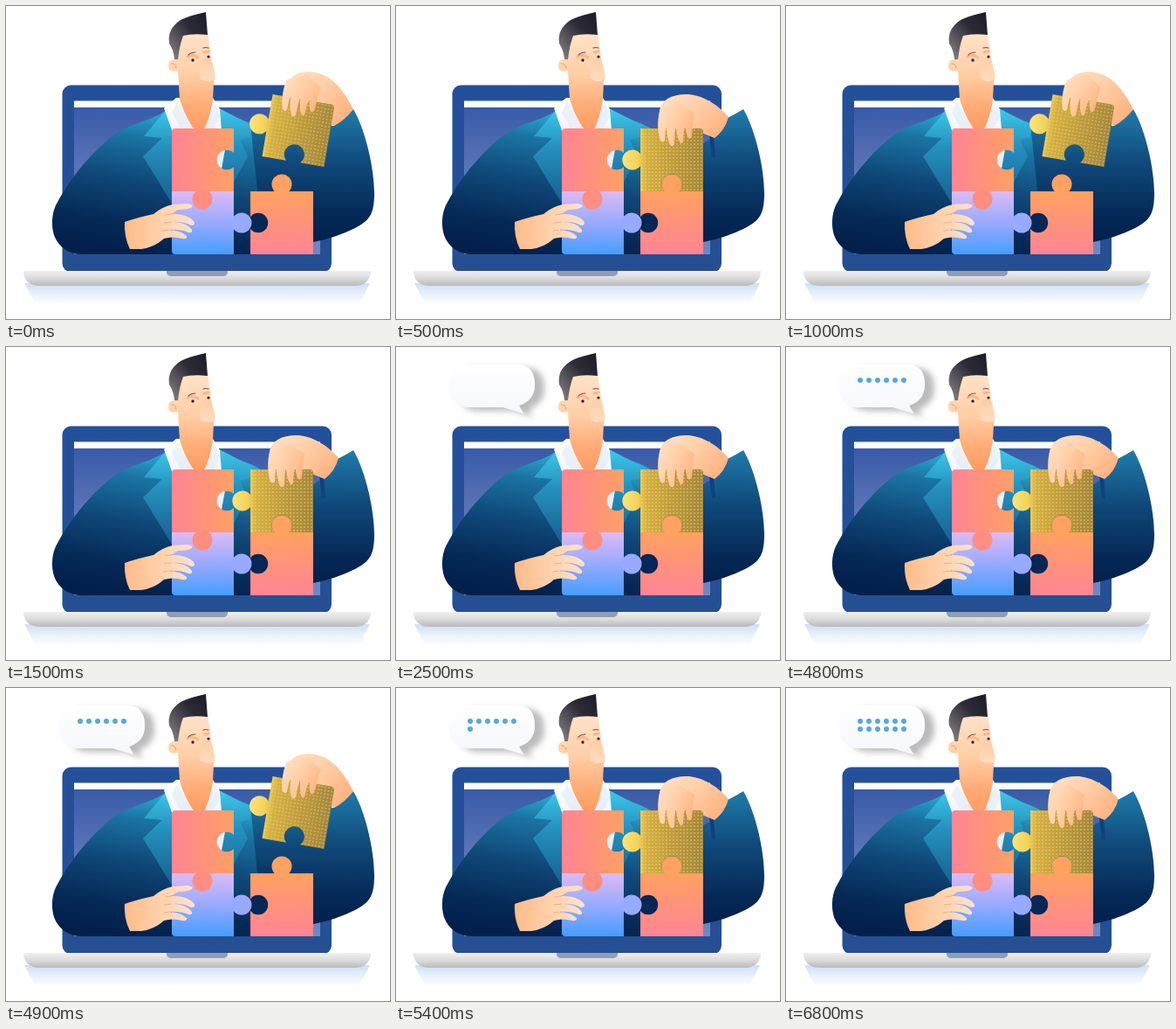
Write an HTML page that moves like this. It is 440x358 px and loops after 7.4 s.

```html
<!DOCTYPE html>
<html lang="en">
<head>
<meta charset="utf-8">
<title>Puzzle at the laptop</title>
<style>
  html, body { margin: 0; width: 100%; height: 100%; overflow: hidden; background: #fff; }
  svg { display: block; width: 100vw; height: 100vh; }
</style>
</head>
<body>
<svg viewBox="0 0 440 358">
  <defs>
    <linearGradient id="bezel" x2="0" y2="1"><stop stop-color="#23509a"/><stop offset="1" stop-color="#264f93"/></linearGradient>
    <linearGradient id="screen" x2="0" y2="1"><stop stop-color="#3458a6"/><stop offset=".45" stop-color="#5c74b8"/><stop offset="1" stop-color="#6f88c4"/></linearGradient>
    <linearGradient id="base" x2="0" y2="1"><stop stop-color="#efefef"/><stop offset=".5" stop-color="#dadada"/><stop offset="1" stop-color="#b9b9bb"/></linearGradient>
    <linearGradient id="floor" x2="0" y2="1"><stop stop-color="#cfdff5"/><stop offset=".5" stop-color="#eaf1fb"/><stop offset="1" stop-color="#fff"/></linearGradient>
    <linearGradient id="suit" gradientUnits="userSpaceOnUse" x1="187" y1="117" x2="160" y2="284">
      <stop stop-color="#2fb4dc"/><stop offset=".22" stop-color="#1b74a4"/><stop offset=".52" stop-color="#0f4778"/><stop offset=".82" stop-color="#052956"/><stop offset="1" stop-color="#03204c"/>
    </linearGradient>
    <linearGradient id="sleeve" gradientUnits="userSpaceOnUse" x1="0" y1="118" x2="0" y2="270">
      <stop stop-color="#1f7caa"/><stop offset=".4" stop-color="#104a7b"/><stop offset=".8" stop-color="#052856"/><stop offset="1" stop-color="#03204c"/>
    </linearGradient>
    <linearGradient id="lapel" gradientUnits="userSpaceOnUse" x1="0" y1="117" x2="0" y2="229">
      <stop stop-color="#3cc9ea"/><stop offset=".4" stop-color="#2590bd"/><stop offset="1" stop-color="#155c8d"/>
    </linearGradient>
    <linearGradient id="shirt" x2="0" y2="1"><stop stop-color="#fff"/><stop offset="1" stop-color="#e3ebf5"/></linearGradient>
    <linearGradient id="face" gradientUnits="userSpaceOnUse" x1="212" y1="35" x2="218" y2="140">
      <stop stop-color="#ffe1c6"/><stop offset=".4" stop-color="#ffcfa6"/><stop offset=".75" stop-color="#ffac76"/><stop offset="1" stop-color="#ff9c62"/>
    </linearGradient>
    <linearGradient id="nose" x2="0" y2="1"><stop stop-color="#ffcda4"/><stop offset="1" stop-color="#ffdcc0"/></linearGradient>
    <linearGradient id="hair" x1="1" x2="0" y2="1"><stop stop-color="#1b1b27"/><stop offset=".4" stop-color="#2c2b36"/><stop offset="1" stop-color="#8b8587"/></linearGradient>
    <linearGradient id="hand" x2="1"><stop stop-color="#ffbb88"/><stop offset=".55" stop-color="#ffd3ae"/><stop offset="1" stop-color="#ffe3cb"/></linearGradient>
    <linearGradient id="grip" x2="1" y2=".6"><stop stop-color="#ffe2c8"/><stop offset=".5" stop-color="#ffd0a9"/><stop offset="1" stop-color="#ffb482"/></linearGradient>
    <linearGradient id="pink" x2="1"><stop stop-color="#ff8495"/><stop offset="1" stop-color="#ffa063"/></linearGradient>
    <linearGradient id="violet" x2="0" y2="1"><stop stop-color="#dcbaf4"/><stop offset=".5" stop-color="#98aaff"/><stop offset="1" stop-color="#459dff"/></linearGradient>
    <linearGradient id="orange" x2="0" y2="1"><stop stop-color="#ffa15f"/><stop offset="1" stop-color="#ff8496"/></linearGradient>
    <linearGradient id="gold" gradientUnits="userSpaceOnUse" x1="-57" x2="36">
      <stop stop-color="#fce57c"/><stop offset=".2" stop-color="#f2d158"/><stop offset=".3" stop-color="#d6b040"/><stop offset=".65" stop-color="#bd9a3b"/><stop offset="1" stop-color="#a4863a"/>
    </linearGradient>
    <pattern id="specks" width="4" height="4" patternUnits="userSpaceOnUse"><circle cx="2" cy="2" r=".7" fill="#f3de94"/></pattern>
    <linearGradient id="talk" x2="0" y2="1"><stop stop-color="#fff"/><stop offset="1" stop-color="#f6f7fd"/></linearGradient>
    <filter id="shade" x="-20%" y="-20%" width="150%" height="160%"><feDropShadow dx="11" dy="4" stdDeviation="3.800" flood-color="#555" flood-opacity=".4"/></filter>
  </defs>

  <!-- laptop -->
  <path fill="url(#floor)" d="M21 317H417L404 342H34z"/>
  <rect x="64.500" y="90.500" width="308.500" height="214" rx="10" fill="url(#bezel)"/>
  <path fill="url(#screen)" d="M78 108H360V284H78z"/>
  <path fill="#fbfdff" d="M78 108.500H360V116H78z"/>
  <path fill="url(#base)" d="M20 303H418V306Q415 320 399 320H39Q23 320 20 306z"/>
  <path fill="#919db2" d="M184 303H254V305Q253 309 249 309H189Q185 309 184 305z"/>

  <!-- man -->
  <path fill="url(#suit)" d="M186 117C172 131 143 132 119 151C94 172 72 199 57 228C52 239 52 252 55 262C60 276 72 284 87 284H352V185C328 160 296 141 280 134Q257 126 244 117z"/>
  <path fill="url(#lapel)" d="M185 117L158 149L179 151L157 172L192 229V135zM244 117L283 137L279 150L268 153L277 172L246 229L243 130z"/>
  <path fill="url(#shirt)" d="M195 105L181 117L190 142V192H246L251 164L247 142L245 118L237 105z"/>
  <path fill="#d3e0ee" d="M196 110L214 139L204 147L190 122zM239 110L228 139L234 147L245 126z" opacity=".4"/>
  <path fill="url(#face)" d="M197 34L231 31Q234 48 235 59L239 77Q240 83 238 86L237 108Q234 126 228 139Q221 146 214 139Q203 122 199 106L197 74Q186 77 186 68Q186 60 195 61z"/>
  <path fill="none" stroke="#ee9e6e" d="M189 66Q194 65 195 71"/>
  <path fill="url(#hair)" d="M187 43Q185 30 193 22C202 12 217 10 229 7L231 33Q215 31 203 34Q199 44 197 61H193Q192 50 187 43z"/>
  <path fill="none" stroke="#ffb684" stroke-width="3" stroke-linecap="round" d="M208 58Q214 54 220 59M227 53L232 52"/>
  <path fill="url(#nose)" d="M226 60Q221 73 222 82Q228 88 237 85Q241 82 238 76L234 59z"/>
  <path fill="none" stroke="#6c5252" stroke-width="1.100" stroke-linecap="round" d="M209 56Q212 53 217 53M226 48Q229 47 232 48"/>
  <circle cx="214" cy="62" r="1.700" fill="#2b202b"/>
  <circle cx="232" cy="58" r="1.600" fill="#2b202b"/>

  <!-- far arm and hand, behind the gold piece -->
  <g class="up">
    <path fill="url(#sleeve)" d="M398 118C413 144 422 188 422 214C422 236 418 245 400 254Q378 265 352 270L290 230L280 134L300 142L376 137z"/>
    <path fill="url(#grip)" d="M398 118C390 103 381 88 366 80C352 73 336 74 328 81C319 89 318 105 320 115L350 122L376 137Q388 131 398 118z"/>
  </g>
  <g class="down">
    <path fill="url(#sleeve)" d="M380 128Q390 123 398 118C413 144 422 188 422 214C422 236 418 245 400 254Q378 265 352 270V157L364 150z"/>
    <path fill="#123f7f" d="M359 148L364 150L366 173H362z"/>
    <path fill="url(#grip)" d="M381 127C370 114 354 103 336 101C318 100 305 106 302 119L301 141L338 140L365 151Q377 142 381 127z"/>
  </g>

  <!-- puzzle -->
  <path fill="url(#pink)" d="M190 144Q190 140 194 140H261V168A11.300 11.300 0 1 0 261 184V212H190z"/>
  <path fill="url(#violet)" d="M190 212H261V284H194Q190 284 190 280z"/>
  <circle cx="225" cy="221" r="11.500" fill="#ff8e80"/>
  <path fill="url(#orange)" d="M280 212H352V284H280z"/>
  <circle cx="289" cy="248" r="11.200" fill="#052756"/>
  <circle cx="270" cy="248" r="11.500" fill="#98aaff"/>
  <g id="piece">
    <path fill="url(#gold)" d="M-36-36H32Q36-36 36-32V36H8A11.500 11.500 0 1 0-8 36H-36V7A11.500 11.500 0 1 1-36-7z"/>
    <path fill="url(#specks)" d="M-36-36H32Q36-36 36-32V36H8A11.500 11.500 0 1 0-8 36H-36z"/>
  </g>
  <circle cx="316" cy="204" r="11.500" fill="#ffa160"/>
  <path id="fingers" fill="url(#grip)" d="M-14-56C-17-44-16-30-13-22Q-10-19-8-22Q-8-32-6-41Q-6-25-2-17Q1-14 3-18Q3-30 5-41Q5-28 9-20Q12-17 13-21Q13-32 16-42Q15-31 19-25Q22-23 23-28Q24-38 26-54L8-66z"/>

  <!-- near hand -->
  <path fill="url(#hand)" d="M136 247Q150 242 169 238Q178 230 191 227L208 226Q215 227 213 230Q209 233 197 233L189 238Q207 237 215 246Q218 251 212 251Q203 246 190 247Q207 247 213 256Q214 260 209 259Q199 255 187 256Q201 257 207 263Q208 267 202 266Q191 263 181 266Q170 276 155 278H142Q135 264 136 247z"/>
  <path fill="none" stroke="#f4aa78" stroke-width=".9" d="M182 239L190 238M181 248L190 247M180 257L187 256"/>

  <!-- speech bubble -->
  <g id="bubble">
    <path filter="url(#shade)" fill="url(#talk)" d="M82 20H138Q159 20 159 43Q159 61 141 67L146 76L123 69H82Q61 67 60 44Q60 20 82 20z"/>
    <g id="dots" fill="#58a9d8"></g>
  </g>
</svg>
<script>
  const LOOP = 7400, TALK = 2500;
  const dotTimes = [3000, 3500, 3600, 4200, 4700, 4800, 5400, 5900, 6000, 6600, 6700, 6800];
  const lifts = [[0, 500], [1000, 1500], [4900, 5400]];
  const get = id => document.getElementById(id);
  const show = (el, on) => el.setAttribute('visibility', on ? 'visible' : 'hidden');

  const dots = dotTimes.map((_, i) => {
    const dot = document.createElementNS('http://www.w3.org/2000/svg', 'circle');
    dot.setAttribute('cx', 85 + i % 6 * 10);
    dot.setAttribute('cy', i < 6 ? 38 : 47);
    dot.setAttribute('r', 3);
    get('dots').append(dot);
    return dot;
  });

  const start = performance.now();
  function draw(now) {
    const t = Math.max(0, now - start) % LOOP;
    const up = lifts.some(([from, to]) => t >= from && t < to);
    document.querySelectorAll('.up').forEach(el => show(el, up));
    document.querySelectorAll('.down').forEach(el => show(el, !up));
    get('piece').setAttribute('transform', up ? 'translate(335 142.5) rotate(9.7)' : 'translate(316 176)');
    get('fingers').setAttribute('transform', up ? 'translate(326 142) rotate(9.7)' : 'translate(316 176)');
    show(get('bubble'), t >= TALK);
    dots.forEach((dot, i) => show(dot, t >= dotTimes[i]));
    requestAnimationFrame(draw);
  }
  draw(start);
</script>
</body>
</html>
```
